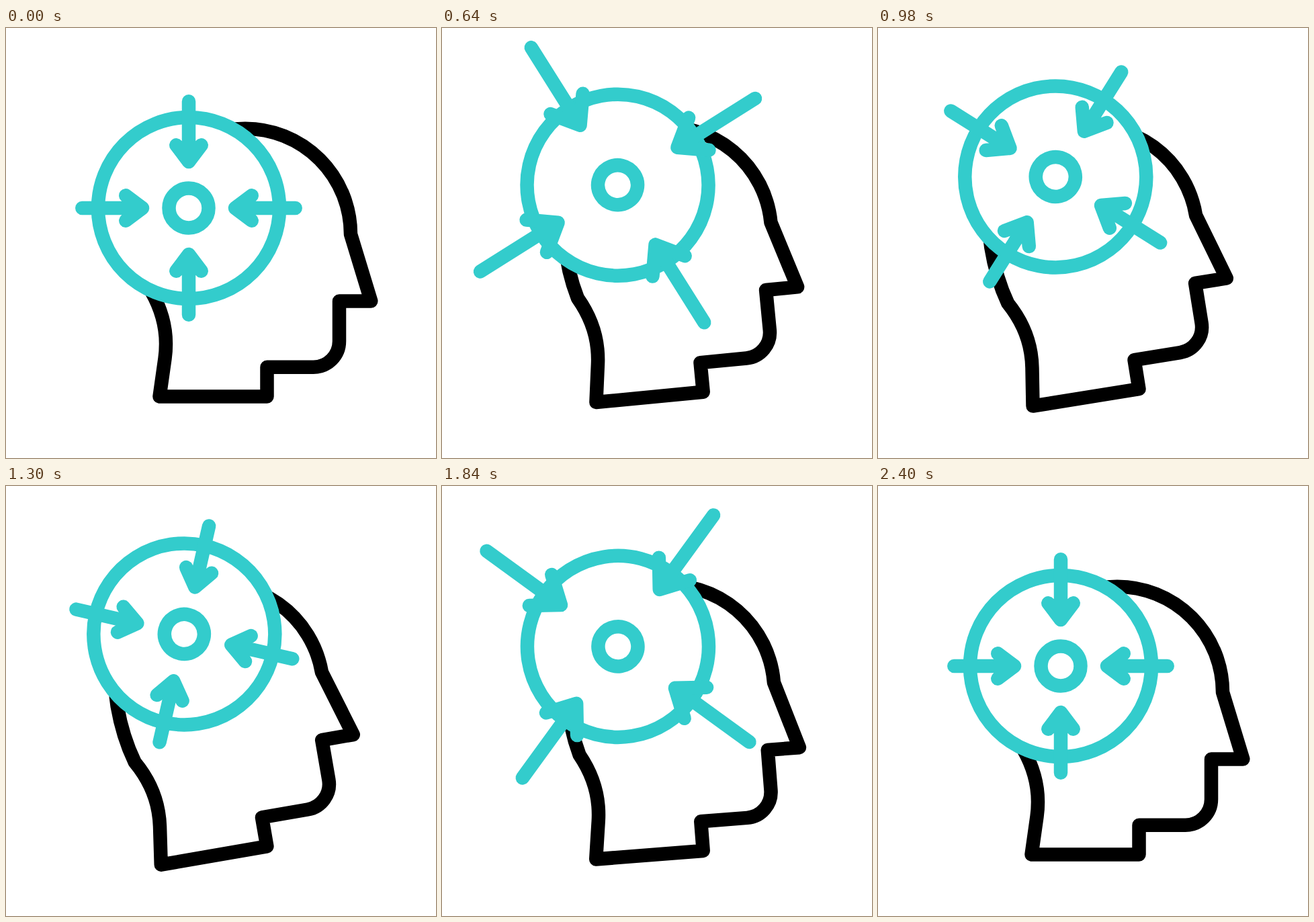
Recreate the animation shown at these times as an HTML page. Size 640x640 px, loop 2.42 s.

```html
<!DOCTYPE html>
<html lang="en">
<head>
<meta charset="utf-8">
<title>Focus</title>
<style>
  html, body { margin: 0; width: 100%; height: 100%; overflow: hidden; background: #fff; }
  svg { display: block; width: 100%; height: 100%; }
</style>
</head>
<body>
<svg viewBox="0 0 640 640" fill="none" stroke-width="20.5" stroke-linecap="round" stroke-linejoin="round">
  <defs>
    <path id="arrow" d="M0-158.7V-69M-18.7-93.7L0-69L18.7-93.7"/>
  </defs>
  <g id="head">
    <path stroke="#000" d="M228.5 548.5H388.5V504.7H457.5A38.5 38.5 0 0 0 496 466.2V406.4H543.3L513 307
      A157 157.3 0 0 0 356 149.7C272 149.7 204.5 218 204.5 305C204.5 335 209 367 216 391.5
      C230 416 238 442 238 470C238 478 237.5 485 236.5 492Z"/>
    <g id="scope" stroke="#3cc">
      <circle r="135" fill="#fff"/>
      <circle r="29.5"/>
      <g id="arrows">
        <use href="#arrow"/>
        <use href="#arrow" transform="rotate(90)"/>
        <use href="#arrow" transform="rotate(180)"/>
        <use href="#arrow" transform="rotate(270)"/>
      </g>
    </g>
  </g>
</svg>
<script>
  const LOOP = 2420, SPAN = 2400, STROKE = 20.5;
  const [head, scope, arrows] = ['head', 'scope', 'arrows'].map(id => document.getElementById(id));

  const ease = x => x * x * (3 - 2 * x);
  // Eased swing 0 -> 1 -> 0 over one period
  const swing = (t, period) => ease(1 - Math.abs(1 - 2 * (t % period) / period));
  const rad = deg => deg * Math.PI / 180;

  // The scope slides along an arc within the tilting head
  const FROM = rad(7), TO = rad(85);
  function slide(p) {
    const a = FROM + (TO - FROM) * p;
    return [272 + 55.8 * (Math.cos(FROM) - Math.cos(a)),
            268 - 59.5 * (Math.sin(a) - Math.sin(FROM))];
  }

  function draw(now) {
    const t = Math.min(now % LOOP, SPAN);
    const tilt = swing(t, SPAN);
    const spin = 360 * ease(t / SPAN);
    const scale = 1 + 0.53 * swing(t, SPAN / 2);
    head.setAttribute('transform', `rotate(${-10 * tilt} 318 543)`);
    scope.setAttribute('transform', `translate(${slide(tilt)}) rotate(${spin})`);
    arrows.setAttribute('transform', `scale(${scale})`);
    arrows.setAttribute('stroke-width', STROKE / scale);
  }

  const start = performance.now();
  function tick() {
    draw(performance.now() - start);
    requestAnimationFrame(tick);
  }
  tick();
</script>
</body>
</html>
```
